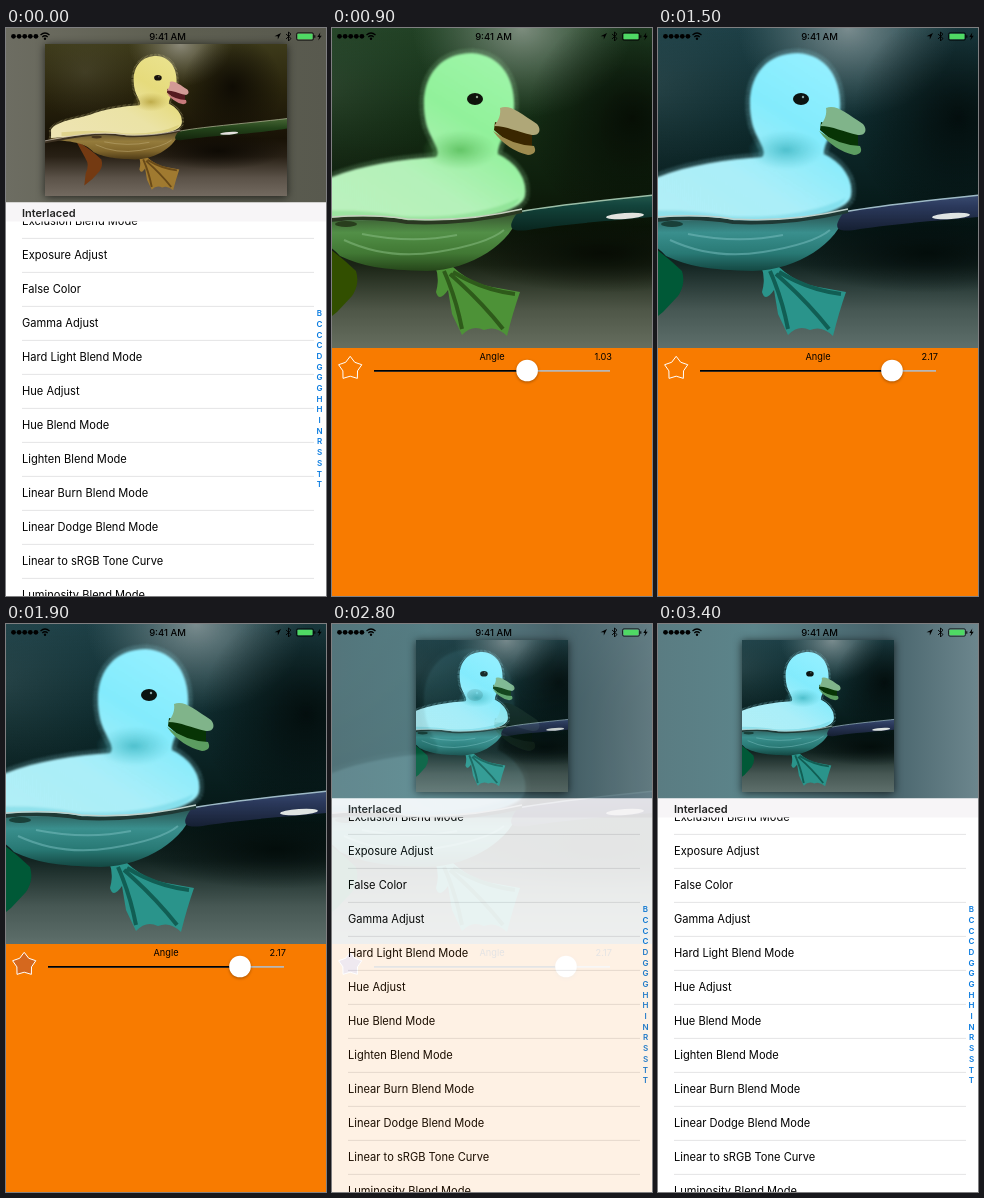
Recreate the animation shown at these times as an HTML page. Size 320 by 568 pixels, loop 3.5 s.

```html
<!DOCTYPE html>
<html lang="en">
<head>
<meta charset="utf-8">
<title>Hue Adjust</title>
<style>
  html, body { margin: 0; width: 100%; height: 100%; overflow: hidden; background: #fff; }
  svg { font-family: Inter, "Liberation Sans", sans-serif; }
  #stage { display: block; width: 100%; height: 100%; }
  #rows { font-size: 11.1px; }
  #index { font-size: 8px; font-weight: 600; fill: #087be0; text-anchor: middle; }
  .label { font-size: 9.2px; }
  .thumb { filter: drop-shadow(0 1px 4px #000a); }
</style>
</head>
<body>
<svg id="stage" viewBox="0 0 320 568">
  <defs>
    <linearGradient id="air" x2="0" y2="1">
      <stop offset="0" stop-color="#3d3a1a"/><stop offset=".3" stop-color="#2a250d"/>
      <stop offset=".62" stop-color="#181206"/><stop offset=".74" stop-color="#282015"/>
      <stop offset=".88" stop-color="#5b5248"/><stop offset="1" stop-color="#736a60"/>
    </linearGradient>
    <radialGradient id="haze">
      <stop offset="0" stop-color="#99978a" stop-opacity=".85"/><stop offset="1" stop-color="#7a775c" stop-opacity="0"/>
    </radialGradient>
    <radialGradient id="shade">
      <stop offset="0" stop-color="#0a0702" stop-opacity=".85"/><stop offset="1" stop-color="#0a0702" stop-opacity="0"/>
    </radialGradient>
    <linearGradient id="down" x1="0" y1="1" x2="1" y2="0">
      <stop offset="0" stop-color="#eee4b4"/><stop offset=".45" stop-color="#ebe3a6"/>
      <stop offset=".7" stop-color="#e6db7c"/><stop offset="1" stop-color="#ebe492"/>
    </linearGradient>
    <radialGradient id="throat">
      <stop offset="0" stop-color="#b09b34" stop-opacity=".75"/><stop offset="1" stop-color="#c0ab48" stop-opacity="0"/>
    </radialGradient>
    <linearGradient id="belly" x2="0" y2="1">
      <stop offset="0" stop-color="#54472a"/><stop offset=".35" stop-color="#957c3c"/>
      <stop offset=".7" stop-color="#80662c"/><stop offset="1" stop-color="#4d3a17"/>
    </linearGradient>
    <linearGradient id="wave" x2="0" y2="1">
      <stop offset="0" stop-color="#476635"/><stop offset=".45" stop-color="#23431a"/><stop offset="1" stop-color="#14240c"/>
    </linearGradient>
    <linearGradient id="warm">
      <stop offset="0" stop-color="#6d6d62"/><stop offset=".5" stop-color="#5e5f51"/><stop offset="1" stop-color="#58594e"/>
    </linearGradient>
    <linearGradient id="cool">
      <stop offset="0" stop-color="#5a7c82"/><stop offset=".3" stop-color="#5c858b"/>
      <stop offset=".7" stop-color="#46626a"/><stop offset="1" stop-color="#6c868d"/>
    </linearGradient>
    <filter id="soft" x="-10%" y="-10%" width="120%" height="120%"><feGaussianBlur stdDeviation="1"/></filter>
    <path id="duck" d="M-82 180C-70 162-30 158 0 149 30 137 70 131 104 129 110 122 98 112 94 95 85 53 105 25 140 25 172 27 184 55 182 82 180 98 166 112 166 126 185 135 196 152 193 168 191 180 165 188 130 193 80 196 30 189-82 198z"/>

    <g id="photo">
      <path fill="url(#air)" d="M-95 0H415V320H-95z"/>
      <ellipse cx="190" cy="0" rx="110" ry="90" fill="url(#haze)"/>
      <ellipse cx="-10" cy="60" rx="120" ry="100" fill="url(#haze)" opacity=".18"/>
      <ellipse cx="300" cy="90" rx="105" ry="110" fill="url(#shade)"/>
      <ellipse cx="270" cy="225" rx="140" ry="40" fill="url(#shade)"/>
      <path fill="#743a12" d="M-30 203Q0 220 24 243Q28 256 20 268L5 284-12 298-9 272Q0 255-10 240z"/>
      <path fill="#a07a30" d="M103 238L121 239Q138 255 160 259L188 264Q181 284 175 308Q164 297 152 302Q140 296 130 307L120 286 116 262Q107 275 104 264 108 250 103 238z"/>
      <path fill="none" stroke="#694a18" stroke-width="4" d="M112 243Q124 270 130 301M118 246Q148 272 171 301M121 244Q150 262 183 266"/>
      <use href="#duck" fill="none" stroke="#d9cf8c" stroke-width="9" stroke-dasharray="1 1.6" opacity=".5" filter="url(#soft)"/>
      <g filter="url(#soft)">
        <use href="#duck" fill="url(#down)"/>
        <ellipse cx="128" cy="122" rx="38" ry="20" fill="url(#throat)"/>
        <path fill="#c9b958" opacity=".4" d="M-60 186Q20 178 70 188 140 192 188 170 180 188 130 193 60 194-60 194z"/>
      </g>
      <path fill="url(#belly)" d="M-90 200C-40 193 30 190 100 194 150 194 180 186 188 184 180 215 140 242 95 243 50 242 30 238 8 228-10 207-40 205-90 200z"/>
      <path fill="none" stroke="#c4b27c" stroke-width="2" opacity=".5" d="M12 212Q55 232 105 224T172 202M30 206Q80 216 125 207"/>
      <ellipse cx="143" cy="71" rx="8" ry="6" fill="#16110c"/>
      <circle cx="145" cy="69" r="1.2" fill="#aaa28c"/>
      <path fill="#561a20" d="M163 94L200 106 200 122Q178 118 162 102z"/>
      <path fill="#c77a7c" d="M161 103Q180 117 202 118Q206 126 196 127 175 122 161 103z"/>
      <path fill="#d29a96" d="M168 80C178 76 188 85 205 96 210 102 207 108 200 107 185 104 175 98 162 98 167 92 169 86 168 80z"/>
      <path fill="url(#wave)" d="M186 184C230 175 320 168 415 157V178C360 188 260 192 202 201 185 204 170 205 186 184z"/>
      <path fill="none" stroke="#b3b898" stroke-width="1.5" d="M186 184C230 175 320 168 415 157"/>
      <ellipse cx="293" cy="188" rx="19" ry="3" fill="#e6e2e0" transform="rotate(-4 293 188)"/>
      <path fill="none" stroke="#3d3222" stroke-width="4" d="M-95 207C-40 196 20 184 75 194 120 196 160 190 190 183"/>
      <path fill="none" stroke="#d5cbc0" stroke-width="1.5" d="M-95 204C-40 193 20 182 75 191 120 194 160 188 190 181"/>
      <ellipse cx="14" cy="196" rx="11" ry="3" fill="#46351d"/>
    </g>
  </defs>

  <g id="editor">
    <path fill="#f87b00" d="M0 320H320V568H0z"/>
    <svg width="320" height="320" viewBox="0 0 320 320"><use class="hue" href="#photo"/></svg>
    <path id="star" stroke="#fff" stroke-linejoin="round" fill="#6b3078"/>
    <text class="label" x="160" y="332" text-anchor="middle">Angle</text>
    <text class="label" id="value" x="280" y="332" text-anchor="end"></text>
    <path stroke="#b7b7b7" stroke-width="1.7" d="M42 342.800H278"/>
    <path id="track" stroke="#000" stroke-width="1.7"/>
    <circle id="knob" cy="342.5" r="10.8" fill="#fff" style="filter:drop-shadow(0 1.5px 1.5px #0005)"/>
  </g>

  <g id="list">
    <path fill="#fff" d="M0 174H320V568H0z"/>
    <path id="backdrop" d="M0 0H320V174.500H0z"/>
    <g class="thumb"><svg id="thumb" y="16" height="152"><use class="hue" href="#photo"/></svg></g>
    <g id="rows"></g>
    <path fill="#f7f5f7" d="M0 174.500H320V193.500H0z"/>
    <text x="16" y="188.500" font-size="11" font-weight="600" fill="#222">Interlaced</text>
    <g id="index"></g>
  </g>

  <g id="status">
    <g id="dots"></g>
    <path fill="none" stroke="#000" stroke-width="1.3" d="M34.500 7Q39 3 43.500 7M36.300 9Q39 6.600 41.700 9"/>
    <circle cx="39" cy="10.800" r="1.200"/>
    <text x="161.500" y="11.800" font-size="9.500" font-weight="500" text-anchor="middle">9:41 AM</text>
    <path d="M275 5L271.800 11.500V8.300H268.500z"/>
    <path fill="none" stroke="#000" stroke-width=".9" d="M280 6L285 10.500 282.500 13V4L285 6.200 280 11"/>
    <rect x="290.500" y="4.800" width="17" height="7.400" rx="1.500" fill="none" stroke="#000" stroke-width=".7"/>
    <rect x="291.500" y="5.700" width="15" height="5.600" rx=".8" fill="#4fd964"/>
    <path d="M308.300 7.200h1v2.600h-1zM314.300 4.500L311.300 9H313.200L312.300 12.500 315.700 7.800H313.700z"/>
  </g>
</svg>
<script>
const $ = id => document.getElementById(id);
const LOOP = 3500, STEP = 100;

const names = ["Exclusion Blend Mode", "Exposure Adjust", "False Color", "Gamma Adjust",
  "Hard Light Blend Mode", "Hue Adjust", "Hue Blend Mode", "Lighten Blend Mode",
  "Linear Burn Blend Mode", "Linear Dodge Blend Mode", "Linear to sRGB Tone Curve",
  "Luminosity Blend Mode"];
$("rows").innerHTML = names.map((name, i) =>
  `<text x="16" y="${197.2 + 34 * i}">${name}</text>
   <path stroke="#dededf" stroke-width=".8" d="M16 ${210.4 + 34 * i}H308"/>`).join("");
$("index").innerHTML = [..."BCCCDGGGHHINRSSTT"].map((c, i) =>
  `<text x="313.5" y="${288.3 + 10.68 * i}">${c}</text>`).join("");
$("dots").innerHTML = [0, 1, 2, 3, 4].map(i =>
  `<circle cx="${7.5 + 5.6 * i}" cy="8.3" r="2.4"/>`).join("");

const corners = Array.from({ length: 10 }, (_, i) => {
  const a = i * Math.PI / 5, r = i % 2 ? 7.7 : 12.2;
  return [18.2 + r * Math.sin(a), 340.5 - r * Math.cos(a)];
});
$("star").setAttribute("d", `M${corners.join("L")}Z`);

const ramp = (t, a, b) => Math.min(1, Math.max(0, (t - a) / (b - a)));
const smooth = (t, a, b) => { const u = ramp(t, a, b); return u * u * (3 - 2 * u); };

// [time in ms, angle in radians]
const drag = [[400, 0], [500, .14], [900, 1.03], [1300, 1.94], [1500, 2.17]];
function angleAt(t) {
  let v = 0;
  for (let i = 1; i < drag.length; i++) {
    const [t0, v0] = drag[i - 1], [t1, v1] = drag[i];
    v += (v1 - v0) * ramp(t, t0, t1);
  }
  return v;
}

function draw(t) {
  const angle = angleAt(t), x = 160 + 34.1 * angle, edited = t > 2000;
  for (const use of document.querySelectorAll(".hue")) use.style.filter = `hue-rotate(${angle}rad)`;
  $("value").textContent = angle.toFixed(2);
  $("knob").setAttribute("cx", x);
  $("track").setAttribute("d", `M42 342.8H${x}`);
  $("star").setAttribute("fill-opacity", ramp(t, 1800, 2200));

  $("list").style.opacity = edited ? smooth(t, 2400, 2900) : 1 - smooth(t, 0, 400);
  $("backdrop").setAttribute("fill", edited ? "url(#cool)" : "url(#warm)");
  const width = edited ? 152 : 242;
  const thumb = $("thumb");
  thumb.setAttribute("x", 160 - width / 2);
  thumb.setAttribute("width", width);
  thumb.setAttribute("viewBox", edited ? "0 0 320 320" : "-94.7 0 509.4 320");
}

const start = performance.now();
function tick() {
  const t = (performance.now() - start) % LOOP;
  draw(Math.floor(t / STEP) * STEP);
  requestAnimationFrame(tick);
}
tick();
</script>
</body>
</html>
```
